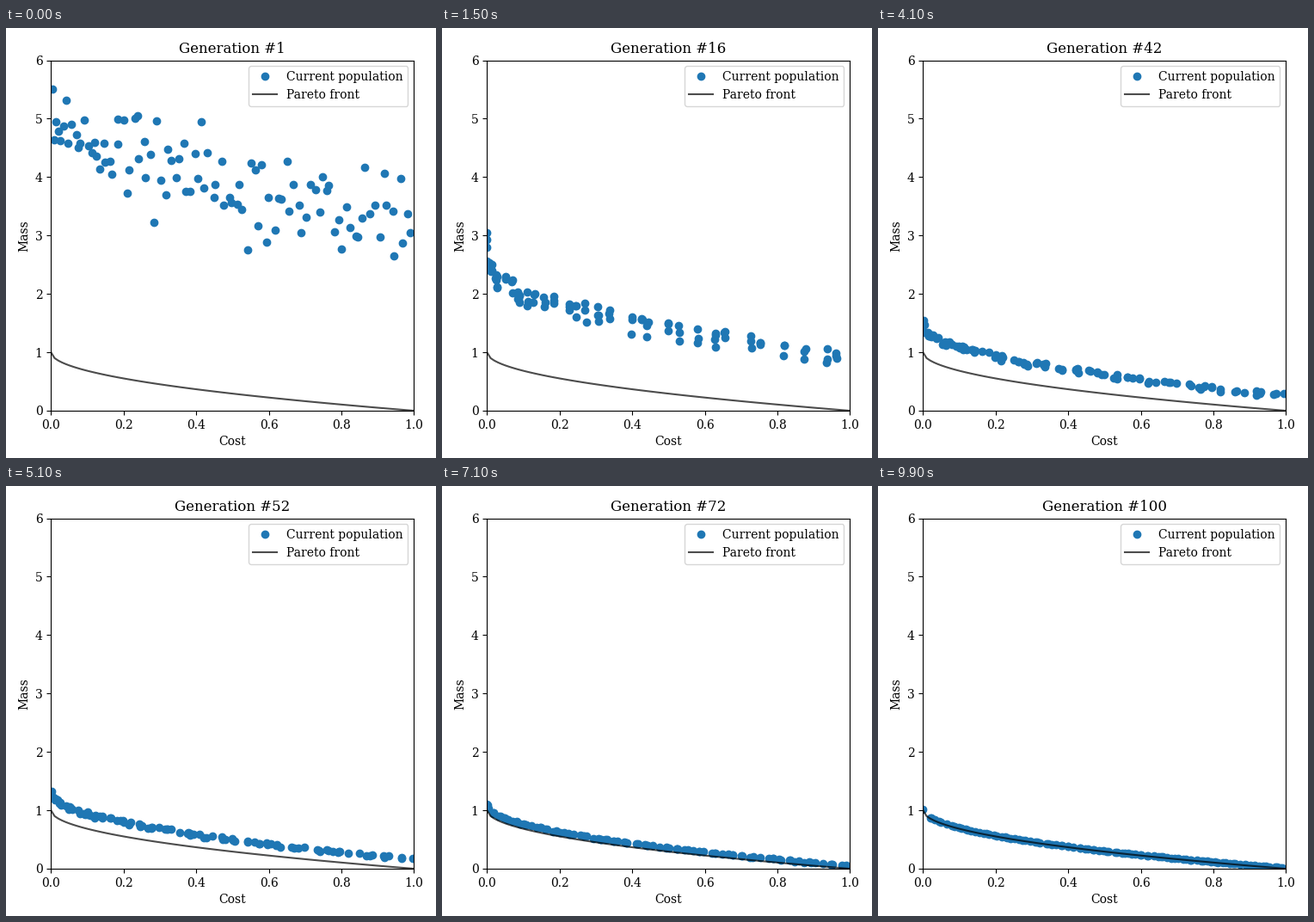
Write a matplotlib script that moves like this. It is 500 px wide and 500 px high and loops after 10000 ms.

```python
import numpy as np
import matplotlib.pyplot as plt
from matplotlib.animation import FuncAnimation

SIZE, GENERATIONS = 100, 100
STAGE = 14
rng = np.random.default_rng(5)


def spread(count, skew=1.0):
    """Sorted costs with random gaps, denser on the left for a high skew."""
    cost = (np.arange(count) + rng.uniform(0, 1, count)) / count
    return cost ** skew


def niche_costs(gen):
    """One cost per individual, gathered in niches that multiply over time."""
    niches = spread(int(20 + 0.8 * gen), 1.9 - 0.009 * gen)
    niches[0] = 0
    cost = niches[np.arange(SIZE) * len(niches) // SIZE]
    return np.clip(cost + rng.normal(0, 0.0015, SIZE), 0, 1)


def distance(gen):
    """Mean gap to the front, falling exponentially in three phases."""
    keys = np.log([4.5, 1.45, 0.29, 0.018])
    return np.exp(np.interp(gen, [1, 16, 52, 100], keys))


def reach(cost):
    """Relative surplus allowed; the cheapest designs may lag behind."""
    return np.where(cost < 0.004, 0.4, 0.12)


def evolve():
    cost = spread(SIZE, 1.15)
    g = 1 + 9 * rng.uniform(size=(SIZE, 29)).mean(axis=1)
    history = [(cost, g)]
    end = 1
    for gen in range(2, GENERATIONS + 1):
        if gen > end:
            end = gen + STAGE - 1 if end > 1 else gen + STAGE
            target = niche_costs(end)
            moved = np.zeros(SIZE, bool)

        gap = distance(gen)
        weak = g > 1 + gap * (1.05 + reach(cost))
        moving = ~moved & (rng.uniform(size=SIZE) < 1 / (end - gen + 1))
        cost = np.where(moving, target, cost)
        moved |= moving

        # Weak and moving individuals are replaced, the others survive
        child = 1 + gap * (1 + rng.uniform(-0.13, reach(cost)))
        g = np.where(weak | moving, child, g)
        history.append((cost, g))
    return history


history = evolve()

plt.rcParams["font.family"] = "DejaVu Serif"
fig, ax = plt.subplots(figsize=(5, 5), dpi=100)
fig.subplots_adjust(left=0.1046, right=0.9486, top=0.925, bottom=0.11)
population, = ax.plot([], [], "o", color="tab:blue",
                      label="Current population")
x = np.linspace(0, 1, 100)
ax.plot(x, 1 - np.sqrt(x), color="black", alpha=0.7, label="Pareto front")
ax.set(xlim=(0, 1), ylim=(0, 6), xlabel="Cost", ylabel="Mass")
title = ax.set_title("Generation #1")
ax.legend(loc="upper right")


def update(i):
    cost, g = history[i]
    population.set_data(cost, g - np.sqrt(cost * g))
    title.set_text(f"Generation #{i + 1}")
    return population, title


anim = FuncAnimation(fig, update, frames=GENERATIONS, interval=100,
                     repeat=True, repeat_delay=0)
plt.show()
```
